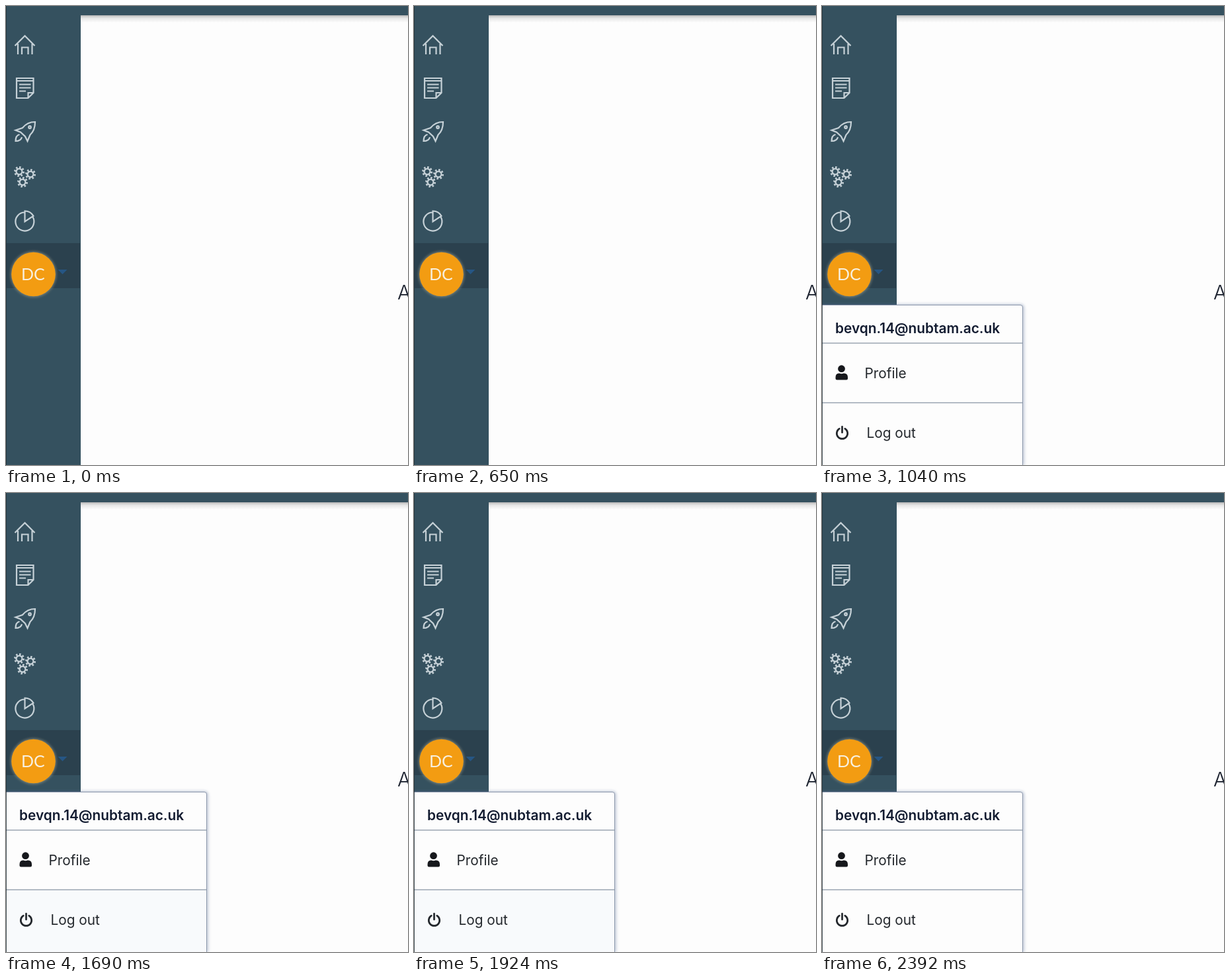
Animation, 608 px wide and 693 px high, one loop 2600 ms. Source, as an HTML page:

```html
<!DOCTYPE html>
<html lang="en">
<head>
<meta charset="utf-8">
<title>Account menu</title>
<style>
  html, body { margin: 0; width: 100%; height: 100%; overflow: hidden; background: #fdfdfd; }
  svg { display: block; width: 608px; height: 693px; }
  text { font-family: Inter, sans-serif; font-size: 20.8px; fill: #23272c; }
  .icons { fill: none; stroke: #c6d1d7; stroke-width: 2.2; }
  .email { font-weight: 600; fill: #131c31; }
  .initials { font: 25px Lato, sans-serif; fill: #f8f0df; }
  .heading { font-size: 30px; font-weight: 300; fill: #1d2330; }
  .menu, .hover { animation: 2600ms step-end infinite; }
  .menu { animation-name: menu; }
  .profile { animation-name: profile; }
  .logout { animation-name: logout; }
  @keyframes menu { 0% { visibility: hidden } 40%, 100% { visibility: visible } }
  @keyframes profile { 0% { opacity: 0 } 50% { opacity: 1 } 65%, 100% { opacity: 0 } }
  @keyframes logout { 0% { opacity: 0 } 65% { opacity: 1 } 80%, 100% { opacity: 0 } }
</style>
</head>
<body>
<svg viewBox="0 0 608 693">
  <defs>
    <linearGradient id="shade" x2="0" y2="1">
      <stop stop-color="#000" stop-opacity=".27"/>
      <stop offset=".4" stop-color="#000" stop-opacity=".09"/>
      <stop offset="1" stop-color="#000" stop-opacity="0"/>
    </linearGradient>
    <filter id="blur" x="-20%" y="-20%" width="140%" height="140%">
      <feGaussianBlur stdDeviation="2"/>
    </filter>
    <g id="gear">
      <circle r="4.4" stroke-width="2.2"/>
      <circle r="6.6" stroke-width="2.8" pathLength="16" stroke-dasharray="1 1"/>
    </g>
  </defs>

  <rect width="608" height="693" fill="#fdfdfd"/>
  <rect x="113" y="14" width="495" height="11" fill="url(#shade)"/>
  <path d="M0 0H608V14H113V693H0Z" fill="#35515f"/>
  <rect y="358" width="112" height="68" fill="#2b414e"/>

  <g class="icons">
    <path d="M13.5 60L28.5 45L43.5 60M18 57V73M39.5 57V73M24 73V62.5H33.5V73"/>
    <path d="M16 109H41.5V131L33.5 139H16ZM16 113H41.5M33.5 139V131H41.5M20 118.5H37.5M20 123.5H37.5M20 128.5H30"/>
    <path d="M44 175C35 175 29 179 25 184L14.5 187.5L22 190.5L29 197L32.500 204L36.500 194.500C41.500 190 44 184 44 175Z"/>
    <path d="M20.500 194C16 195 14.500 198 14.500 204C20 204 23 202.500 24 198"/>
    <circle cx="36" cy="183" r="1.800"/>
    <use href="#gear" x="20" y="250"/>
    <use href="#gear" x="37" y="254"/>
    <use href="#gear" x="25" y="266"/>
    <path d="M28.500 311.500A14 14 0 1 0 40.500 318.500M28.500 325.500V309.500Q37 309.500 41.500 317Z"/>
  </g>

  <circle cx="41.500" cy="405" r="34" fill="#a9a58c" opacity=".75" filter="url(#blur)"/>
  <circle cx="41.500" cy="405" r="33.300" fill="#f39c12"/>
  <text class="initials" x="23" y="414">DC</text>
  <path d="M78.500 398H92.500L85.500 405Z" fill="#265684"/>
  <text class="heading" x="592" y="443">A</text>

  <g class="menu">
    <path d="M0 452H300Q304 452 304 456V693" fill="none" stroke="#536b93" stroke-width="3" opacity=".5" filter="url(#blur)"/>
    <path d="M-5 451.500H300Q303.500 451.500 303.500 455V700H-5Z" fill="#fdfdfd" stroke="#8793a8"/>
    <rect class="hover profile" x="1" y="510" width="302" height="89" fill="#f7f8fa"/>
    <rect class="hover logout" x="1" y="600" width="302" height="93" fill="#f8fafc"/>
    <path d="M0 509H303M0 599H303" stroke="#9aa5b3" stroke-width="1.500"/>
    <text class="email" x="20" y="494">bevqn.14@nubtam.ac.uk</text>
    <g fill="#16181c">
      <circle cx="29.500" cy="547.700" r="5.400"/>
      <path d="M20.500 564V560.500Q20.500 554.500 26 554.500Q29.500 556 33 554.500Q39 554.500 39 560.500V562.500Q39 564.500 37 564.500H22.500Q20.500 564.500 20.500 562.500Z"/>
    </g>
    <path d="M26.300 638.200A8.200 8.200 0 1 0 34.700 638.200M30.500 635V644" fill="none" stroke="#23272c" stroke-width="2.700" stroke-linecap="round"/>
    <text x="64.500" y="562">Profile</text>
    <text x="67.500" y="652">Log out</text>
  </g>
  <path d="M.5 0V693" stroke="#1c2b33" opacity=".8"/>
</svg>
</body>
</html>
```
